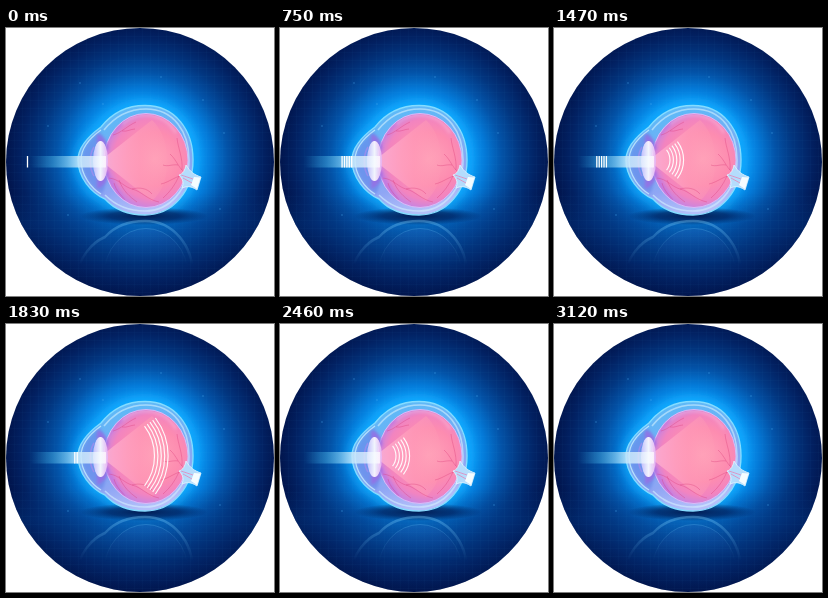
Write an HTML page that moves like this. It is 268 by 268 pixels and loops after 3150 ms.

```html
<!DOCTYPE html>
<html lang="en">
<head>
<meta charset="utf-8">
<title>Light entering the eye</title>
<style>
html, body { margin: 0; width: 100%; height: 100%; overflow: hidden; background: #fff; }
svg { display: block; width: 100vw; height: 100vh; }
</style>
</head>
<body>
<svg viewBox="0 0 268 268" fill="none">
  <defs>
    <radialGradient id="sky" gradientUnits="userSpaceOnUse" cx="136" cy="130" r="138">
      <stop offset="0" stop-color="#14b2ff"/>
      <stop offset=".4" stop-color="#0c9cf8"/>
      <stop offset=".5" stop-color="#047ad8"/>
      <stop offset=".62" stop-color="#0353a8"/>
      <stop offset=".75" stop-color="#023680"/>
      <stop offset=".88" stop-color="#022162"/>
      <stop offset="1" stop-color="#01134a"/>
    </radialGradient>
    <linearGradient id="floor" x1="0" y1="0" x2="0" y2="1">
      <stop offset="0" stop-color="#023a86" stop-opacity="0"/>
      <stop offset=".3" stop-color="#023a86" stop-opacity=".4"/>
      <stop offset="1" stop-color="#021f5c" stop-opacity=".2"/>
    </linearGradient>
    <radialGradient id="shade">
      <stop offset="0" stop-color="#01134a" stop-opacity=".95"/>
      <stop offset=".55" stop-color="#011c58" stop-opacity=".7"/>
      <stop offset="1" stop-color="#01215c" stop-opacity="0"/>
    </radialGradient>
    <linearGradient id="shell" x1=".2" y1="0" x2=".5" y2="1">
      <stop offset="0" stop-color="#58bcf8"/>
      <stop offset=".45" stop-color="#74aef4"/>
      <stop offset=".75" stop-color="#8fa6f4"/>
      <stop offset="1" stop-color="#b4c0fa"/>
    </linearGradient>
    <radialGradient id="flesh" gradientUnits="userSpaceOnUse" cx="148" cy="131" r="54">
      <stop offset="0" stop-color="#ffa4ba"/>
      <stop offset=".5" stop-color="#fd8cb0"/>
      <stop offset=".75" stop-color="#f284c0"/>
      <stop offset="1" stop-color="#b884ee"/>
    </radialGradient>
    <linearGradient id="cone" gradientUnits="userSpaceOnUse" x1="98" y1="0" x2="170" y2="0">
      <stop offset="0" stop-color="#ffb4d4" stop-opacity=".8"/>
      <stop offset=".5" stop-color="#ff9ab8" stop-opacity=".7"/>
      <stop offset="1" stop-color="#ffa0b4" stop-opacity="0"/>
    </linearGradient>
    <linearGradient id="ray" gradientUnits="userSpaceOnUse" x1="24" y1="0" x2="98" y2="0">
      <stop offset="0" stop-color="#36a8e0" stop-opacity="0"/>
      <stop offset=".3" stop-color="#4cb4e4" stop-opacity=".45"/>
      <stop offset=".5" stop-color="#86ccf0" stop-opacity=".7"/>
      <stop offset=".65" stop-color="#c4e6fa" stop-opacity=".85"/>
      <stop offset="1" stop-color="#fff" stop-opacity=".7"/>
    </linearGradient>
    <linearGradient id="lens" x1="0" y1="0" x2="1" y2="0">
      <stop offset="0" stop-color="#c9c0ff"/>
      <stop offset=".5" stop-color="#fff"/>
      <stop offset="1" stop-color="#e4b4f4"/>
    </linearGradient>
    <linearGradient id="fade" x1="0" y1="0" x2="0" y2="1">
      <stop offset="0" stop-color="#fff" stop-opacity=".38"/>
      <stop offset="1" stop-color="#fff" stop-opacity="0"/>
    </linearGradient>
    <mask id="mirror" maskUnits="userSpaceOnUse" x="40" y="191" width="190" height="50">
      <rect x="40" y="191" width="190" height="46" fill="url(#fade)"/>
    </mask>
    <pattern id="grid" width="8" height="8" patternUnits="userSpaceOnUse">
      <path d="M0 .5H8M.5 0V8" stroke="#4fc3ff" stroke-opacity=".035" stroke-width=".7"/>
    </pattern>
    <filter id="soft" x="-30%" y="-30%" width="160%" height="160%"><feGaussianBlur stdDeviation="5"/></filter>
    <filter id="haze" x="-20%" y="-20%" width="140%" height="140%"><feGaussianBlur stdDeviation="1.5"/></filter>
    <clipPath id="disc"><circle cx="134" cy="134" r="134"/></clipPath>
    <clipPath id="inside"><ellipse cx="140" cy="132.5" rx="41" ry="46"/></clipPath>
    <clipPath id="outside"><rect x="20" y="120" width="53" height="28"/></clipPath>
    <path id="globe" d="M139 77.5C170 77.5 187 103 187 132C187 163 167 187 139 187C121 187 108 181 99 171C85 165 72 149 72 132C72 121 80 110 95 99C106 85 121 77.5 139 77.5Z"/>
  </defs>

  <g clip-path="url(#disc)">
    <rect width="268" height="268" fill="url(#sky)"/>
    <rect y="165" width="268" height="103" fill="url(#floor)"/>
    <rect width="268" height="268" fill="url(#grid)"/>
    <g id="dots" fill="#4fb4f4" fill-opacity=".3"></g>
    <use href="#globe" fill="#12b8ff" stroke="#12b0ff" stroke-width="9" opacity=".6" filter="url(#soft)"/>
    <ellipse cx="138" cy="188" rx="64" ry="9" fill="url(#shade)"/>

    <g mask="url(#mirror)">
      <g transform="translate(0 380) scale(1 -1)" stroke="#7fd0ff">
        <use href="#globe" fill="#2a70c0" fill-opacity=".3" stroke-width="2.5"/>
        <ellipse cx="140" cy="132.5" rx="42" ry="47" fill="#6a70c8" fill-opacity=".3" stroke-width=".8"/>
      </g>
    </g>

    <use href="#globe" fill="url(#shell)" stroke="#84dcff" stroke-width="1.4"/>
    <path d="M98 102C110 87 123 81 140 81C168 81 183 104 183 132C183 161 164 183 139 183C121 183 109 177 99 167" stroke="#d4f0ff" stroke-width="1.6" stroke-opacity=".6"/>
    <path d="M94 104C82 112 76 121 76 132C76 147 85 160 96 166C103 154 104 117 94 104Z" fill="#6486e8" fill-opacity=".6" filter="url(#haze)"/>
    <path d="M95 102C81 112 75 121 75 132C75 147 85 160 95 166" stroke="#c8eeff" stroke-width="1.2" stroke-opacity=".8"/>

    <ellipse cx="140" cy="132.5" rx="42" ry="47" fill="url(#flesh)" stroke="#d8bcf8" stroke-width="1"/>
    <g clip-path="url(#inside)">
      <path d="M98 130L103 112L124 88L90 85V180L124 179L100 140Z" fill="#b468e4" fill-opacity=".35" filter="url(#haze)"/>
      <path d="M99 129L146 92C166 110 167 155 146 173L99 136Z" fill="url(#cone)"/>
      <g stroke="#d83d78" stroke-width=".6" stroke-opacity=".6">
        <path d="M103 150C113 151 118 159 126 161C135 163 142 172 153 174M113 152C117 163 124 169 131 174M126 161C133 159 141 160 146 166M108 155C110 163 116 168 119 172"/>
        <path d="M181 146C173 142 171 132 164 126M181 146C169 148 164 154 155 156M176 142C177 130 172 120 171 110M173 148C169 157 164 164 157 170M172 137C166 136 162 139 157 137"/>
        <path d="M107 107C115 105 121 98 130 94M116 103C121 104 125 101 129 101"/>
      </g>
      <path d="M116 96C132 82 158 84 170 105" stroke="#ffd3e6" stroke-width="2.5" stroke-opacity=".4" filter="url(#haze)"/>
    </g>

    <path d="M173 147C177 146 179 142 180 137C184 144 189 147 195 149L191 162C185 158 181 158 176 160C178 155 177 151 173 147Z" fill="#b4dcfc" stroke="#e4f6ff" stroke-width=".8"/>
    <path d="M188 149L194.5 149.5L191 161L185 157Z" fill="#f4fcff"/>
    <path d="M175 147L187 151M177 150L186 155" stroke="#e87cb0" stroke-width=".7"/>

    <path d="M91 106C99 108 103 116 102 123L91 116ZM91 161C99 158 103 151 102 143L91 150Z" fill="#9a6ce4" fill-opacity=".8" filter="url(#haze)"/>
    <ellipse cx="94.5" cy="133" rx="7.5" ry="20" fill="url(#lens)" fill-opacity=".9"/>
    <path d="M88 119C83 127 83 140 88 148" stroke="#a58cf0" stroke-width="1.5" stroke-opacity=".7"/>
    <rect x="24" y="128" width="76" height="11.5" fill="url(#ray)"/>
    <g clip-path="url(#outside)"><g id="bars" stroke="#fff" stroke-width="1.3"></g></g>
    <g clip-path="url(#inside)"><g id="arcs" stroke="#fff" stroke-width="1.15" stroke-opacity=".92"></g></g>
  </g>
</svg>
<script>
const LOOP = 3150, STEP = 30, COUNT = 5;
const STARTS = [0, 990];
const FOCUS = { x: 99, y: 132 };
const SPREAD = 37 * Math.PI / 180;
const byId = id => document.getElementById(id);
const ramp = (v, a, b) => Math.min(1, Math.max(0, (v - a) / (b - a)));

// One gently accelerating path carries a pulse from the left to the retina.
const front = age => 21.5 + age * 0.06 + age * age * 9.2e-6;

function add(parent, tag, attrs = {}) {
  const el = document.createElementNS('http://www.w3.org/2000/svg', tag);
  for (const key in attrs) el.setAttribute(key, attrs[key]);
  return parent.appendChild(el);
}

for (const [cx, cy] of [[155, 49], [97, 76], [74, 55], [197, 72], [218, 105], [42, 98], [62, 187], [214, 181]])
  add(byId('dots'), 'circle', { cx, cy, r: 0.9 });

const waves = STARTS.flatMap(start => Array.from({ length: COUNT }, (_, i) => ({
  start, i, bar: add(byId('bars'), 'path'), arc: add(byId('arcs'), 'path')
})));

function arcPath(r) {
  const x = FOCUS.x + r * Math.cos(SPREAD), dy = r * Math.sin(SPREAD);
  return `M${x} ${FOCUS.y - dy}A${r} ${r} 0 0 1 ${x} ${FOCUS.y + dy}`;
}

function draw(time) {
  for (const { start, i, bar, arc } of waves) {
    const age = time - start;
    const x = front(age) - i * 2.4;
    bar.setAttribute('d', `M${x} 128V139.5`);
    bar.setAttribute('opacity', age >= 0 && x >= 21 ? 1 : 0);

    const r = front(age) - i * 3.4 - FOCUS.x;
    const shown = age > 0 ? ramp(r, 2, 8) * (1 - ramp(age, 1960, 2110)) : 0;
    arc.setAttribute('d', arcPath(Math.max(r, 1)));
    arc.setAttribute('opacity', shown);
  }
}

const origin = performance.now();
function tick() {
  const time = (performance.now() - origin) % LOOP;
  draw(Math.floor(time / STEP) * STEP);
  requestAnimationFrame(tick);
}
tick();
</script>
</body>
</html>
```
